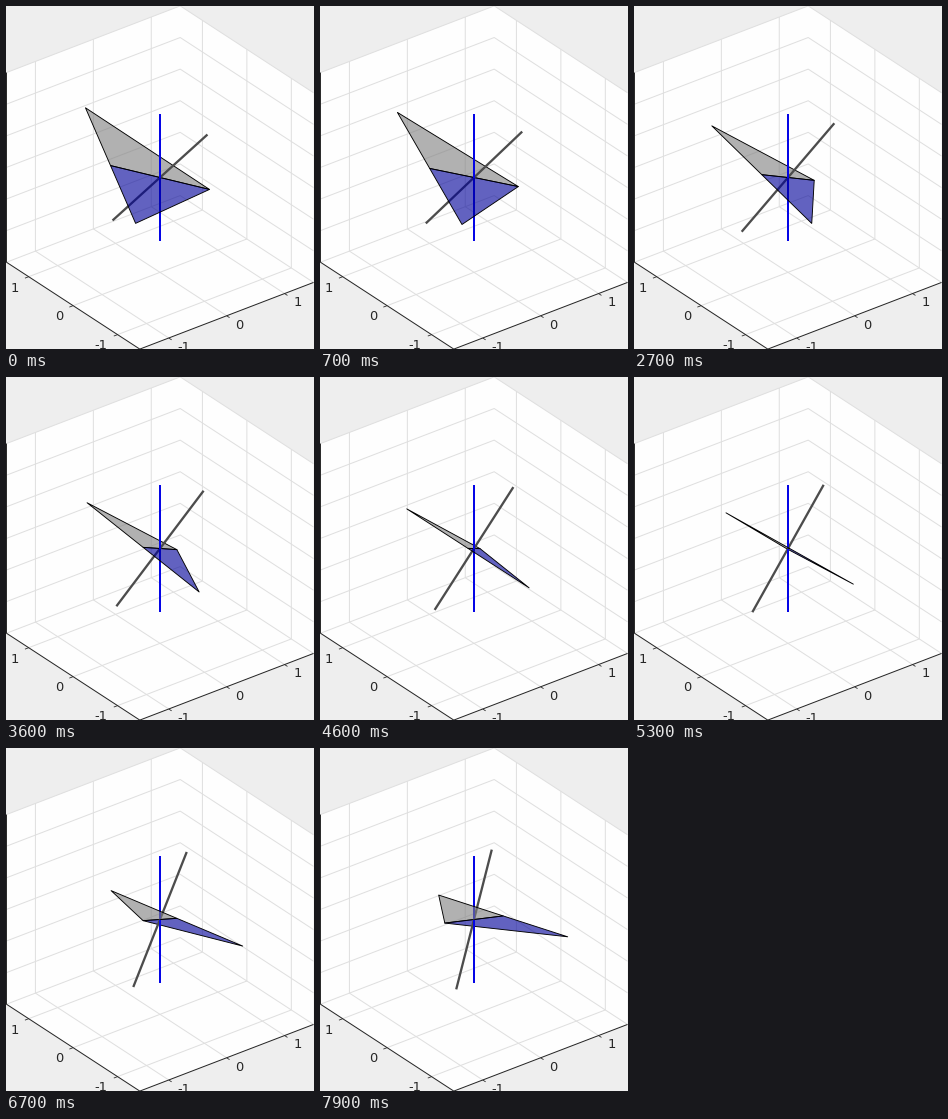
Animation of 308x343 px, one loop 8000 ms. Source, as a matplotlib script:

```python
import numpy as np
import matplotlib.pyplot as plt
from matplotlib.animation import FuncAnimation
from matplotlib.patches import Polygon

W, H, DPI = 308, 343, 64
PX = 72 / DPI                      # one pixel in points
FRAMES, INTERVAL = 80, 100
SCALE, CENTER, LIM = 73.0, np.array([154.0, 171.5]), 1.5

AZ, EL = np.radians([-37.5, 30])
RIGHT = np.array([np.cos(AZ), np.sin(AZ), 0])
UP = np.array([-np.sin(AZ) * np.sin(EL), np.cos(AZ) * np.sin(EL), np.cos(EL)])
VIEWER = np.cross(RIGHT, UP)

INK, GRID = "#262626", "#dfdfdf"


def project(points):
    p = np.atleast_2d(np.asarray(points, float))
    return CENTER + SCALE * np.column_stack([p @ RIGHT, -(p @ UP)])


def rot_x(a):
    c, s = np.cos(a), np.sin(a)
    return np.array([[1, 0, 0], [0, c, -s], [0, s, c]])


def rot_y(a):
    c, s = np.cos(a), np.sin(a)
    return np.array([[c, 0, s], [0, 1, 0], [-s, 0, c]])


def rot_z(a):
    c, s = np.cos(a), np.sin(a)
    return np.array([[c, -s, 0], [s, c, 0], [0, 0, 1]])


fig = plt.figure(figsize=(W / DPI, H / DPI), dpi=DPI, facecolor="#eeeeee")
ax = fig.add_axes([0, 0, 1, 1])
ax.set_xlim(0, W)
ax.set_ylim(H, 0)
ax.axis("off")


def line3d(points, color, width, z):
    xy = project(points)
    return ax.plot(xy[:, 0], xy[:, 1], color=color, lw=width * PX, zorder=z,
                   solid_capstyle="butt", solid_joinstyle="round")[0]


def draw_box():
    L = LIM
    outline = [(-L, L, L), (L, L, L), (L, -L, L),
               (L, -L, -L), (-L, -L, -L), (-L, L, -L)]
    ax.add_patch(Polygon(project(outline), fc="#fefefe", ec="none", zorder=0))
    for t in (-1, 0, 1):
        line3d([(t, -L, -L), (t, L, -L), (t, L, L)], GRID, 1, 1)
        line3d([(-L, t, -L), (L, t, -L), (L, t, L)], GRID, 1, 1)
    for t in np.arange(-L, L + 0.1, 0.5):
        line3d([(-L, L, t), (L, L, t), (L, -L, t)], GRID, 1, 1)
    line3d([(-L, L, L), (-L, L, -L), (-L, -L, -L), (L, -L, -L)], INK, 1, 2)

    tick = 0.065
    for t in (-1, 0, 1):
        line3d([(t, -L, -L), (t, -L - tick, -L)], INK, 0.8, 2)
        line3d([(-L, t, -L), (-L - tick, t, -L)], INK, 0.8, 2)
        for pos, dx, dy, align in (((t, -L, -L), 8.5, 12.8, "left"),
                                   ((-L, t, -L), -10, 14.8, "right")):
            x, y = project(pos)[0]
            ax.text(x + dx, y + dy, str(t), ha=align, va="baseline", color=INK,
                    fontsize=13 * PX, family="DejaVu Sans", zorder=2)


draw_box()

TILT = rot_y(np.radians(30)) @ rot_x(np.radians(30))
NOSE, TAIL = (1, 0, 0), (-1, 0, 0)
WINGS = [((-1, 1, 0), (0.5, 0.5, 0.5)), ((-1, -1, 0), (0, 0, 0.6))]

halves = [ax.add_patch(Polygon(np.zeros((3, 2)), fc=(*color, 0.61), ec="black",
                               lw=0.9 * PX, joinstyle="round", zorder=5))
          for _, color in WINGS]

# Each axis is split at the origin so one half can pass behind the wings.
ends = (1, -1)
normals = [line3d(np.zeros((2, 3)), "#4c4c4c", 2.3, 4) for _ in ends]
poles = [line3d([(0, 0, 0), (0, 0, e)], "#0505e6", 2, 4) for e in ends]


def update(i):
    turn = rot_z(np.radians(i + 1)) @ TILT
    for half, (tip, _) in zip(halves, WINGS):
        half.set_xy(project(np.array([tip, NOSE, TAIL]) @ turn.T))
    n = turn[:, 2]
    facing = n @ VIEWER
    for e, normal, pole in zip(ends, normals, poles):
        normal.set_data(*project([np.zeros(3), e * n]).T)
        z = 6 if e * facing > 0 else 3
        normal.set_zorder(z)
        pole.set_zorder(z + 0.5)
    return halves + normals + poles


anim = FuncAnimation(fig, update, frames=FRAMES, interval=INTERVAL,
                     init_func=lambda: update(0), repeat=True, repeat_delay=0,
                     blit=False)
plt.show()
```
